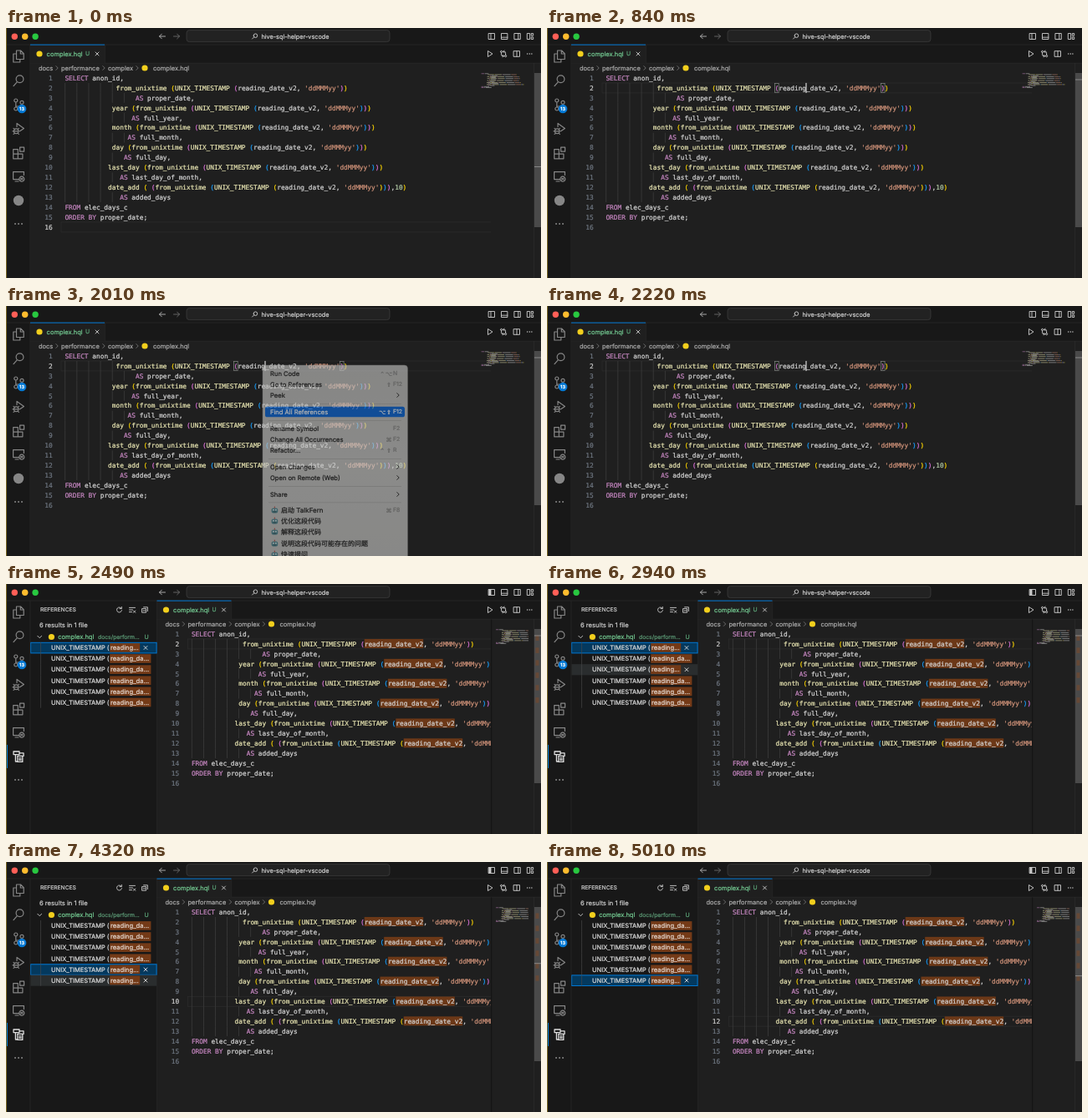
Recreate the animation shown at these times as an HTML page. Size 640 by 300 pixels, loop 5040 ms.

```html
<!DOCTYPE html>
<html lang="en">
<head>
<meta charset="utf-8">
<title>Find all references</title>
<style>
html, body { margin: 0; width: 100%; height: 100%; overflow: hidden; background: #181818; }
svg { display: block; width: 100vw; height: 100vh; }
text { white-space: pre; text-rendering: geometricPrecision; stroke-width: .22px; font-family: Inter, "Noto Sans CJK SC", sans-serif; }
.code { font-family: "DejaVu Sans Mono", monospace; }
.key { font-family: "DejaVu Sans", sans-serif; }
</style>
</head>
<body>
<svg id="stage" viewBox="0 0 640 300" preserveAspectRatio="none"></svg>
<script>
const LOOP = 5040, SHIFT = 151.5;
const CH = 4.7, CODE_SIZE = 7.807, CODE_X = 70.4, LINE_H = 11.93;
const SOURCE = [
  [0, "SELECT anon_id,"],
  [13, "from_unixtime (UNIX_TIMESTAMP (reading_date_v2, 'ddMMMyy'))"],
  [18, "AS proper_date,"],
  [12, "year (from_unixtime (UNIX_TIMESTAMP (reading_date_v2, 'ddMMMyy')))"],
  [17, "AS full_year,"],
  [12, "month (from_unixtime (UNIX_TIMESTAMP (reading_date_v2, 'ddMMMyy')))"],
  [16, "AS full_month,"],
  [12, "day (from_unixtime (UNIX_TIMESTAMP (reading_date_v2, 'ddMMMyy')))"],
  [15, "AS full_day,"],
  [11, "last_day (from_unixtime (UNIX_TIMESTAMP (reading_date_v2, 'ddMMMyy')))"],
  [14, "AS last_day_of_month,"],
  [11, "date_add ( (from_unixtime (UNIX_TIMESTAMP (reading_date_v2, 'ddMMMyy'))),10)"],
  [14, "AS added_days"],
  [0, "FROM elec_days_c"],
  [0, "ORDER BY proper_date;"],
  [0, ""]
];
const SYMBOL = "reading_date_v2";
const BRACKETS = ["#ffd700", "#da70d6", "#179fff"];

// State changes: [time, value]
const ACTIVE_LINE = [[0, 16], [480, 2], [3090, 6], [3600, 8], [3960, 10], [4440, 12]];
const MENU_ITEM = [[0, -1], [1380, 0], [1440, 1], [1530, 2], [1620, 3], [1890, -1], [1935, 3]];
const SELECTED = [[0, 0], [3090, 2], [3600, 3], [3960, 4], [4440, 5]];
const HOVERED = [[0, -1], [2790, 1], [2880, 2], [3420, 3], [3840, 4], [4230, 5]];
const CARET_ON = 480, MENU_ON = 870, FADE_FROM = 1960, FADE_TO = 2110, PANEL_ON = 2490;

const at = (steps, t) => steps.reduce((v, s) => t >= s[0] ? s[1] : v, steps[0][1]);
const lineY = n => 60 + (n - 1) * LINE_H;
const colX = c => CODE_X + c * CH;
const esc = s => s.replace(/&/g, "&amp;").replace(/</g, "&lt;");
const text = (x, y, s, fill = "#ccc", size = 7.5, extra = "") =>
  `<text x="${x}" y="${y + size * 0.36}" fill="${fill}" stroke="${fill}" font-size="${size}" ${extra}>${esc(s)}</text>`;
const rect = (x, y, w, h, fill, extra = "") =>
  `<rect x="${x}" y="${y}" width="${w}" height="${h}" fill="${fill}" ${extra}/>`;
const dot = (x, y, r, fill, extra = "") => `<circle cx="${x}" cy="${y}" r="${r}" fill="${fill}" ${extra}/>`;
const icon = (x, y, d, color = "#d0d0d0", w = 0.9) =>
  `<path transform="translate(${x} ${y})" d="${d}" fill="none" stroke="${color}" stroke-width="${w}" stroke-linejoin="round" stroke-linecap="round"/>`;
const ring = (x, y, r) => `M${x - r},${y}a${r},${r} 0 1,0 ${2 * r},0a${r},${r} 0 1,0 ${-2 * r},0`;
const group = (id, body, extra = "") => `<g id="${id}" ${extra}>${body}</g>`;
const CHEVRON = "M-1.2,-2.4L1.2,0L-1.2,2.4", CLOSE = "M-2,-2L2,2M2,-2L-2,2";
const dots = (x, y, gap, r, fill) => [-1, 0, 1].map(i => dot(x + i * gap, y, r, fill)).join("");
const fileDot = (x, y) => dot(x, y, 3.6, "#f2cf1d");

function tokens([indent, src]) {
  const out = [], re = /'[^']*'|\w+|[^\s]/g;
  let depth = 0, m;
  while ((m = re.exec(src))) {
    const s = m[0];
    let color = "#d4d4d4";
    if (s === "(") color = BRACKETS[depth++ % 3];
    else if (s === ")") color = BRACKETS[--depth % 3];
    else if (s[0] === "'") color = "#ce9178";
    else if (/^\d+$/.test(s)) color = "#b5cea8";
    else if (/^(SELECT|AS|FROM|ORDER|BY)$/.test(s)) color = "#c586c0";
    else if (src.startsWith(" (", re.lastIndex)) color = "#e8e5b2";
    out.push({ col: indent + m.index, s, color });
  }
  return out;
}
const LINES = SOURCE.map(tokens);

function codeArea() {
  let guides = "", refs = "", code = "", nums = "";
  LINES.forEach((line, i) => {
    const y = lineY(i + 1), n = i + 1;
    for (let c = 0; c < SOURCE[i][0]; c += 3)
      guides += rect(colX(c), y - LINE_H / 2, 0.7, LINE_H, "#404040");
    for (const { col, s, color } of line) {
      if (s === SYMBOL) refs += rect(colX(col), y - 5.9, s.length * CH, 11, "#6c3817");
      code += text(colX(col), y, s, color, CODE_SIZE, 'class="code"');
    }
    nums += text(55.6, y, String(n), "#6e7681", CODE_SIZE, `class="code" text-anchor="end" id="num${n}"`);
  });
  const match = [43, 70].map(c =>
    rect(colX(c), lineY(2) - 5.4, CH, 10.8, "#1d261d", 'stroke="#888" stroke-width=".7"')).join("");
  return rect(66, -6, 620, LINE_H, "none", 'id="lineBox" stroke="#2b2b2b" stroke-width=".8"') +
    guides + group("refs", refs) + group("match", match) + code + nums +
    rect(colX(51) - 0.7, lineY(2) - 6, 1.2, 12, "#d8d8d8", 'id="caret"');
}

function editor() {
  const tab = rect(29, 20, 89, 22.5, "#1f1f1f") +
    rect(118, 20, 0.6, 22, "#2b2b2b") + fileDot(40, 31) +
    text(48.6, 31, "complex.hql", "#73c991") + text(95, 31, "U", "#5ba377", 6.9) +
    icon(109, 31, CLOSE);
  const crumbs = [[39, "docs"], [66, "performance"], [122, "complex"], [176, "complex.hql"]]
    .map(([x, s]) => text(x, 48, s, "#a9a9a9")).join("") +
    [61, 117, 157].map(x => icon(x, 48, CHEVRON, "#8a8a8a", 0.7)).join("") + fileDot(166, 48);
  return tab + crumbs + codeArea();
}

function minimap() {
  const w = 0.585;
  let out = "";
  LINES.forEach((line, i) => line.forEach(({ col, s, color }) => {
    out += rect(col * w, 54.4 + i * 1.19, s.length * w, 0.8, color, 'opacity=".62"');
  }));
  return out;
}

const rulerY = n => 54 + (n - 1) * LINE_H * 0.626;
function ruler() {
  const marks = [2, 4, 6, 8, 10, 12].map(n => rect(633.5, rulerY(n), 4, 6.5, "#7a4a2c", 'opacity=".6"')).join("");
  return rect(631.5, 42, 0.6, 258, "#303030") + rect(632, 54, 8, 185, "#4a4a4a") + group("marks", marks) +
    rect(632, 0, 8, 1, "#8a8a8a", 'id="rulerLine"');
}

function titleBar() {
  const box = "M-3.5,-3.5h7v7h-7z";
  return rect(0, 0, 640, 20, "#181818") +
    ["#ff5f57", "#febc2e", "#28c840"].map((c, i) => dot(10.3 + i * 12.4, 10.2, 3.7, c)).join("") +
    icon(187, 10, "M3.5,0H-3.5M-0.7,-2.8L-3.5,0L-0.7,2.8", "#b8b8b8") +
    icon(204, 10, "M-3.5,0H3.5M0.7,-2.8L3.5,0L0.7,2.8", "#6c6c6c") +
    rect(216, 2.6, 243, 14, "#222", 'rx="3.4" stroke="#404040" stroke-width=".7"') +
    icon(297.6, 10, ring(0.8, -0.8, 2.3) + "M-0.9,0.9L-3,3", "#ccc") +
    text(346, 10, "hive-sql-helper-vscode", "#d0d0d0", 7.3, 'text-anchor="middle"') +
    icon(581, 10, box + "M-1,-3.5v7") + rect(577.5, 6.5, 2.5, 7, "#ccc", 'id="sideFill"') +
    icon(596.4, 10, box + "M-3.5,1.2h7") + icon(611.8, 10, box + "M1,-3.5v7") +
    icon(627.2, 10, "M-3.5,-3.5h3v7h-3zM1.5,-3.5h2v2.6h-2zM1.5,0.9h2v2.6h-2z");
}

function editorActions() {
  return icon(579, 31, "M-2.2,-3.3L3,0L-2.2,3.3z") +
    icon(595, 31, ring(-2.4, -2.6, 1.1) + ring(2.6, 2.6, 1.1) +
      "M-2.4,-1.5V1.3q0,1.4 1.4,1.4H0.4M-0.8,1.4L0.5,2.7L-0.8,4M2.6,1.5V-1.3q0,-1.4 -1.4,-1.4H-0.2M1,-4L-0.3,-2.7L1,-1.4") +
    icon(611, 31, "M-3.5,-3.3h7v6.6h-7zM0,-3.3v6.6") + dots(626.3, 31, 2.6, 0.7, "#ccc");
}

function activityBar() {
  const gray = "#868686";
  const list = [
    [34, "M-2.5,-7h5l3.7,3.7v6.8h-8.7zM2.3,-7v4h3.9M-2.5,-3h-3.7v10h8v-3.3"],
    [63, ring(1.5, -1.7, 4.4) + "M-1.6,1.6L-6,6.6"],
    [92, ring(-3.2, -5, 2) + ring(4, -2.6, 2) + ring(-3.2, 5, 2) + "M-3.2,-3V3M4,-0.6q0,2.6 -3.4,2.6h-3"],
    [121, "M-2,-2.4V-6.6L6.4,-0.6L1.6,2.8" + ring(-2.8, 2.8, 2.9) + "M-5.5,2.8h5.4M-6,-0.6l1.4,1.2M0.4,-0.6l-1.4,1.2M-7,2.8h1.2M-6,6.4l1.4,-1.2M0.4,6.4l-1.4,-1.2"],
    [150, "M-6.3,-4.4h5.6v5.6h5.6v5.6h-11.2zM-6.3,1.2h5.6v5.6M1.6,-6.8h5v5h-5z"],
    [178, "M0,3.6H-6.4v-9H6.4v4M-4,6h4" + ring(3.8, 3.2, 3) + "M2.6,2.2l1,1l-1,1M5,2.2l-1,1l1,1"]
  ];
  const refIcon = icon(15.4, 207, "M-6.4,-6h7v3.6h-7zM-4,-2.4v8.4h2.4M-1.6,-0.6h6v7h-6zM0.6,-4.2h5v3.6M0.2,1.8h2.6M0.2,4h2.6", "#e0e0e0", 1.3);
  return rect(0, 20, 29, 280, "#181818") + rect(28.6, 20, 0.6, 280, "#2b2b2b") +
    list.map(([y, d]) => icon(15, y, d, gray, 1.2)).join("") +
    dot(19, 97, 5.3, "#0078d4") + text(19, 97, "13", "#fff", 5.6, 'text-anchor="middle" font-weight="600"') +
    group("plainIcon", dot(15, 207, 6.2, gray)) +
    group("refIcon", rect(1, 193, 1, 28, "#0078d4") + refIcon) + dots(15, 235, 4, 1, gray);
}

function sidePanel() {
  return rect(29, 20, SHIFT, 280, "#181818") + rect(28.6, 20, 0.6, 280, "#2b2b2b") +
    rect(180.2, 20, 0.6, 280, "#2b2b2b") +
    text(41, 31, "REFERENCES", "#ccc", 6.7) +
    icon(135.5, 31, "M2.6,-1.6A3,3 0 1,0 3,0.6M2.8,-3.6V-1.4H0.6") +
    icon(151, 31, "M-3.5,-2.6h7M-3.5,0h4M-3.5,2.6h3M1.4,1l2.4,2.4M3.8,1l-2.4,2.4") +
    icon(166, 31, "M-3,-1.4h4.6v4.6h-4.6zM-1.4,-3.2h4.8v4.8M-1.8,0.9h2.2") +
    text(40, 49.4, "6 results in 1 file", "#ccc", 7.6) +
    icon(40.2, 63.5, "M-2.4,-1.2L0,1.2L2.4,-1.2") + fileDot(54.4, 63.5) +
    text(62.2, 63.5, "complex.hql", "#73c991") + text(110, 63.5, "docs/perform...", "#5b9874", 6.8) +
    text(165.5, 63.5, "U", "#5ba377", 7) + group("rows", "");
}

function row(i, selected, hovered) {
  const y = 76.5 + 13.12 * i, short = selected || hovered;
  const bg = selected ? rect(29.6, y - 6.2, 150.5, 12.6, "#04395e", 'stroke="#0078d4"')
    : hovered ? rect(29.4, y - 6.6, 150.8, 13.2, "#2a2d2e") : "";
  return bg + rect(41, y - 6.5, 0.6, 13.1, "#4a4a4a") +
    rect(124.2, y - 5.4, short ? 36 : 49.2, 10.6, "#743a17") +
    text(54, y, "UNIX_TIMESTAMP (", "#ddd", 7.45) +
    text(125, y, short ? "reading..." : "reading_da...", "#e4d8d0", 7.6) +
    (short ? icon(167, y, CLOSE, "#ddd") : "");
}

// [y, label, modifiers, key]; ">" marks a submenu, "bot" a robot bullet
const MENU = [
  [81, "Run Code", "⌃⌥", "N"], [94, "Go to References", "⇧", "F12"], [107, "Peek", "", ">"],
  [127, "Find All References", "⌥⇧", "F12"],
  [147, "Rename Symbol", "", "F2"], [160, "Change All Occurrences", "⌘", "F2"], [173, "Refactor...", "⌃⇧", "R"],
  [193, "Open Changes", "", ">"], [206, "Open on Remote (Web)", "", ">"], [226, "Share", "", ">"],
  [245, "启动 TalkFern", "⌘", "F8", "bot"], [258, "优化这段代码", "", "", "bot"],
  [271, "解释这段代码", "", "", "bot"], [285, "说明这段代码可能存在的问题", "", "", "bot"],
  [298, "快速提问", "", "", "bot"]
];
const robot = y => rect(317.6, y - 2.6, 7.6, 6.2, "#4f8791", 'rx="2"') + rect(320.8, y - 4.4, 1.2, 2, "#b5554c") +
  dot(319.9, y - 0.3, 0.9, "#e9eeee") + dot(322.9, y - 0.3, 0.9, "#e9eeee") + rect(319.6, y + 1.6, 3.6, 0.8, "#28434a");

function menuItem([y, label, mods, key, bot], on) {
  const ink = on ? "#fff" : "#1e1e1e", soft = on ? "#fff" : "#858583";
  return (on ? rect(310, y - 6.3, 167, 12.6, "#0a66d6", 'rx="2.6"') : "") +
    (bot ? robot(y) : "") + text(bot ? 329 : 316, y, label, ink, bot ? 8 : 7.6) +
    [...mods].map((m, i) => text(458 - (mods.length - 1 - i) * 7.8, y, m, soft, 7, 'class="key" text-anchor="middle"')).join("") +
    (key === ">" ? icon(469, y, CHEVRON, ink, 0.9) : text(463, y, key, soft, 6.9));
}

function menu() {
  return rect(307, 71, 173.5, 250, "url(#menuFill)", 'rx="4" stroke="#8a8a88" stroke-width=".5"') +
    [117, 137, 183, 216, 235.5].map(y => rect(314, y, 159, 0.7, "#a5a5a3")).join("") + group("items", "");
}

const stage = document.getElementById("stage");
stage.innerHTML =
  `<defs><clipPath id="view"><rect x="29" y="20" width="551" height="280"/></clipPath>
  <clipPath id="mapView"><rect x="560" y="50" width="65" height="40"/></clipPath>
  <linearGradient id="menuFill" x1="0" y1="0" x2="0" y2="1"><stop offset="0" stop-color="#bcbcba"/>
  <stop offset=".5" stop-color="#c3c3c1"/><stop offset="1" stop-color="#bebebc"/></linearGradient></defs>` +
  rect(0, 0, 640, 300, "#1f1f1f") + rect(29, 20, 611, 22, "#181818") + rect(29, 41.8, 611, 0.6, "#2b2b2b") +
  `<g clip-path="url(#view)">${group("editor", editor())}</g>` +
  rect(580, 42.5, 1.2, 258, "#151515", 'id="mapShade"') +
  `<g clip-path="url(#mapView)">${group("map", minimap())}</g>` +
  ruler() + group("panel", sidePanel()) + activityBar() +
  titleBar() + rect(0, 19.7, 640, 0.6, "#2b2b2b") +
  group("tabLine", rect(29, 19.6, 89, 1, "#0078d4")) + editorActions() +
  group("menu", menu()) + rect(0, 0, 1, 300, "#75621f");

const $ = id => document.getElementById(id);
const show = (id, on) => $(id).setAttribute("visibility", on ? "visible" : "hidden");
const move = (id, x, y = 0) => $(id).setAttribute("transform", `translate(${x} ${y})`);
let last = "";

function draw(t) {
  const line = at(ACTIVE_LINE, t), item = at(MENU_ITEM, t);
  const sel = at(SELECTED, t), hov = at(HOVERED, t);
  const open = t >= PANEL_ON, caret = t >= CARET_ON && !open;
  const fade = Math.min(1, Math.max(0, (FADE_TO - t) / (FADE_TO - FADE_FROM)));
  $("menu").setAttribute("opacity", t < MENU_ON ? 0 : fade);

  const state = [line, item, sel, hov, open].join();
  if (state === last) return;
  last = state;
  for (const id of ["panel", "refs", "marks", "refIcon", "sideFill", "mapShade"]) show(id, open);
  for (const id of ["caret", "match"]) show(id, caret);
  show("plainIcon", !open);
  move("editor", open ? SHIFT : 0);
  move("tabLine", open ? SHIFT : 0);
  move("map", open ? 586 : 568.6);
  move("lineBox", 0, lineY(line));
  move("rulerLine", 0, rulerY(line));
  SOURCE.forEach((_, i) => {
    const color = i + 1 === line ? "#d0d0d0" : "#6e7681", num = $("num" + (i + 1));
    num.setAttribute("fill", color);
    num.setAttribute("stroke", color);
  });
  $("rows").innerHTML = [0, 1, 2, 3, 4, 5].map(i => row(i, i === sel, i === hov)).join("");
  $("items").innerHTML = MENU.map((m, i) => menuItem(m, i === item)).join("");
}

function tick() {
  draw(performance.now() % LOOP);
  requestAnimationFrame(tick);
}
tick();
</script>
</body>
</html>
```
